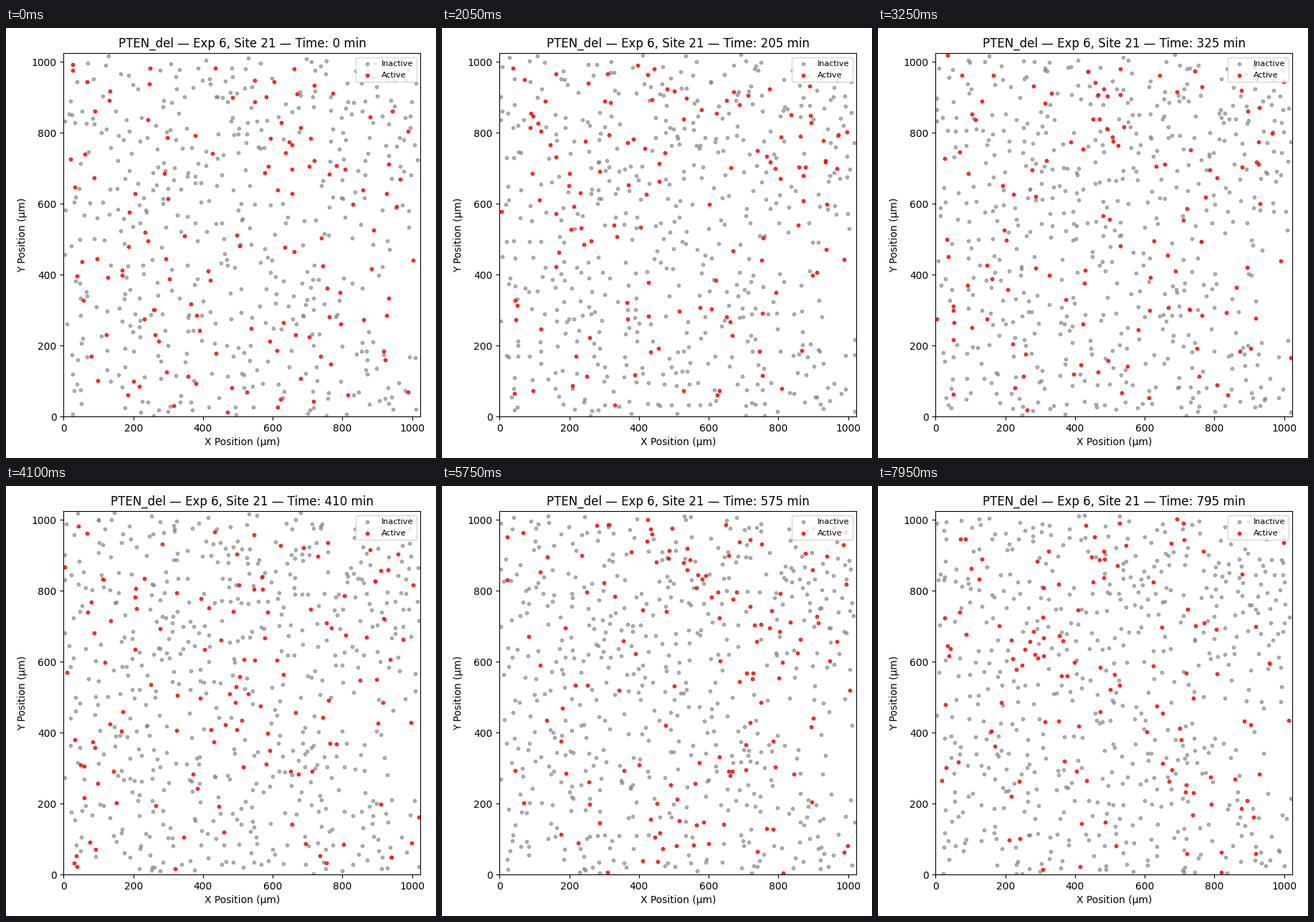
Recreate the animation shown at these times as a matplotlib script. Size 600 by 600 pixels, loop 8000 ms.

```python
import numpy as np
import matplotlib.pyplot as plt
from matplotlib.animation import FuncAnimation

STAGE = 600
SIZE = 1024          # field of view in µm
CELLS = 690
FRAMES = 160
MIN_PER_FRAME = 5
SPAN = FRAMES * MIN_PER_FRAME

rng = np.random.default_rng(21)


def bump(p, x, y, width):
    return np.exp(-((p[0] - x) ** 2 + (p[1] - y) ** 2) / (2 * width ** 2))


def density(p):
    crowded = bump(p, 400, 830, 200) + bump(p, 920, 800, 100)
    empty = bump(p, 960, 400, 110)
    return 0.7 + 0.3 * crowded - 0.4 * empty


def scatter_cells():
    pts = [rng.uniform(3, SIZE - 3, 2)]
    while len(pts) < CELLS:
        p = rng.uniform(3, SIZE - 3, 2)
        gap = np.hypot(*(np.array(pts) - p).T).min()
        if gap > 15 and rng.random() < density(p):
            pts.append(p)
    return np.array(pts)


home = scatter_cells()

# Some cells only come into view during the recording
born = np.where(rng.random(CELLS) < 0.13, rng.uniform(0, SPAN / 2, CELLS), 0)

# Slow wandering: three sine terms per cell and axis
PERIODS = np.array([900, 230, 65])
REACH = np.array([11, 4, 1.3])
sway = REACH * rng.uniform(0.3, 1.3, (CELLS, 2, 3))
sway_phase = rng.uniform(0, 2 * np.pi, (CELLS, 2, 3))

# Individual flicker of activity, on top of a fixed tendency per cell
FLICKER = np.array([160, 70, 31])
flick_phase = rng.uniform(0, 2 * np.pi, (CELLS, 3))
bias = rng.normal(0, 0.6, CELLS)

# Activity waves (peak minute, x, y): a few strong ones among random weak ones
STRONG = np.array([(0, 640, 725), (205, 395, 790), (410, 530, 430),
                   (575, 760, 580), (690, 190, 580), (795, 310, 600)])
weak = rng.uniform((-20, 40, 40), (SPAN + 20, 980, 980), (70, 3))
wave_t, wave_x, wave_y = np.vstack([STRONG, weak]).T
wave_amp = np.where(np.arange(len(wave_t)) < len(STRONG), 1.8, 1.2)


def positions(t):
    shift = sway * np.sin(2 * np.pi * t / PERIODS + sway_phase)
    return np.clip(home + shift.sum(axis=2), 3, SIZE - 4)


def active_mask(t, pos, seen):
    r = np.hypot(pos[:, :1] - wave_x, pos[:, 1:] - wave_y)
    late = t - wave_t - (r - 45) / 4      # the wave front spreads outwards
    pulse = wave_amp * np.exp(-(r / 85) ** 2 - (late / 28) ** 2)
    noise = 0.5 * np.sin(2 * np.pi * t / FLICKER + flick_phase).sum(axis=1)
    score = np.where(seen, bias + noise + pulse.sum(axis=1), -9)
    count = int(round(124 + 7 * np.sin(t / 70)))
    return score >= np.partition(score, -count)[-count]


def title_text(t):
    return f"PTEN_del — Exp 6, Site 21 — Time: {t} min"


fig, ax = plt.subplots(figsize=(STAGE / 100, STAGE / 100), dpi=100)
fig.subplots_adjust(left=80.4 / STAGE, right=578.4 / STAGE,
                    bottom=1 - 542 / STAGE, top=1 - 35.4 / STAGE)
idle = ax.scatter([], [], s=10, c="gray", alpha=0.6, label="Inactive")
lit = ax.scatter([], [], s=10, c="red", alpha=0.8, label="Active")
ax.set_xlim(0, SIZE)
ax.set_ylim(0, SIZE)
ax.set_xlabel("X Position (µm)")
ax.set_ylabel("Y Position (µm)")
title = ax.set_title(title_text(0))
ax.legend(loc="upper right", fontsize=8)


def update(i):
    t = i * MIN_PER_FRAME
    pos = positions(t)
    seen = born <= t
    on = active_mask(t, pos, seen)
    idle.set_offsets(pos[seen & ~on])
    lit.set_offsets(pos[on])
    title.set_text(title_text(t))
    return idle, lit, title


anim = FuncAnimation(fig, update, frames=FRAMES, interval=1000 // 20,
                     repeat=True, repeat_delay=0, blit=False)
plt.show()
```
